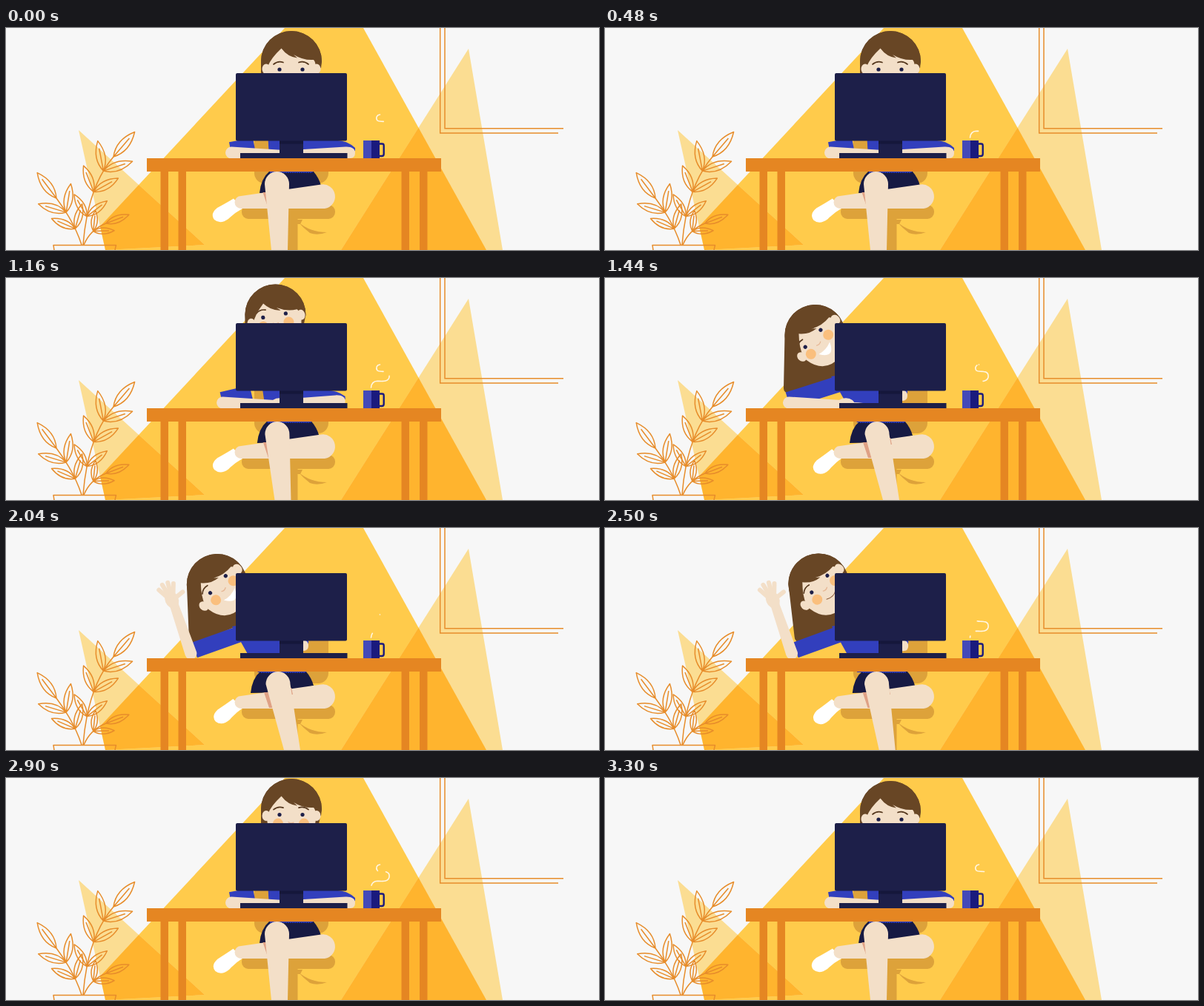
An HTML page for the animation above (3.32 s loop, 800 by 300 pixels).

```html
<!DOCTYPE html>
<html lang="en">
<head>
<meta charset="utf-8">
<title>Peeking from behind the monitor</title>
<style>
  html, body { margin: 0; width: 100%; height: 100%; overflow: hidden; background: #f7f7f7; }
  svg { display: block; width: 100%; height: 100%; }
  .skin { fill: #f3dfc8; }
  .hair { fill: #684625; }
  .blue { fill: #323fbd; }
  .navy { fill: #1d1f49; }
  .wood { fill: #e58622; }
  .chair { fill: #dda23a; }
  .pale { fill: #fbdd92; }
  .blush { fill: #fabf7d; }
  .line { fill: none; stroke: #e78d2b; stroke-width: 1.5; }
  #sleeve { fill: none; stroke: #323fbd; stroke-width: 22; }
  #hem { fill: none; stroke: #323fbd; stroke-width: 1.5; stroke-dasharray: 2 1; }
  #hand { stroke: #f3dfc8; stroke-width: 6; stroke-linecap: round; }
  #steam { fill: none; stroke: #fff6e4; stroke-width: 1.6; stroke-linecap: round; }
</style>
</head>
<body>
<svg viewBox="0 0 800 300" preserveAspectRatio="none">
  <defs>
    <path id="peak" d="M376 0H482L648 300H134L127 268Z"/>
    <path id="west" d="M98 138L268 293L134 300Z"/>
    <path id="east" d="M624 28L670 300H452Z"/>
    <clipPath id="inPeak"><use href="#peak"/></clipPath>
  </defs>
  <rect width="800" height="300" fill="#f7f7f7"/>
  <use href="#peak" fill="#ffcb4b"/>
  <g class="pale"><use href="#west"/><use href="#east"/></g>
  <g clip-path="url(#inPeak)" fill="#ffb42e"><use href="#west"/><use href="#east"/></g>
  <path class="line" d="M585.7 0V142H745M592 0V135.7H752"/>

  <g id="plant" class="line" stroke-linejoin="round">
    <path d="M65 300L64 293.5H148.5L147 300"/>
  </g>

  <g class="chair">
    <rect x="335" y="120" width="100" height="90" rx="14"/>
    <rect x="318" y="239" width="126" height="19" rx="9"/>
    <path d="M380 256H393.5V300H380ZM393 259H400L397 265H393Z"/>
    <path d="M394 262Q410 276 433 276Q420 281 410 277Q402 271 394 262Z"/>
  </g>

  <path id="shorts" fill="#171a43"/>
  <path id="foot" fill="#fff" d="M307 230.500L319 244Q308 250 300 258Q289 266 281 259Q275 251 285 243Q298 236 307 230.500Z"/>
  <path class="skin" d="M317 227L425 211.500A16.400 16.400 0 0 1 430 244H317A8.500 8.500 0 0 1 317 227Z"/>
  <path id="backHair" class="hair"/>
  <path id="torso" class="blue"/>
  <path id="hem"/>
  <path id="shade" fill="#dfa185"/>
  <path id="leg" class="skin"/>
  <path id="farSleeve" class="blue"/>
  <path id="farArm" class="skin"/>
  <path id="sleeve"/>

  <g id="head">
    <path class="skin" d="M-33 -5Q-26 -26 0 -26Q30 -26 33 -5V14Q30 45 0 45Q-30 45 -33 14Z"/>
    <g id="face">
      <circle class="blush" cx="-18" cy="12" r="7"/>
      <circle class="blush" cx="17" cy="12" r="7"/>
      <circle class="navy" cx="-16" r="2.600"/>
      <circle class="navy" cx="15" r="2.600"/>
      <path d="M-24 -7Q-18 -12 -11 -9.500M10 -9.500Q17 -12 23 -7" fill="none" stroke="#55371d" stroke-width="1.700" stroke-linecap="round"/>
      <path d="M-4 10Q-1 12.500 3 10.500" fill="none" stroke="#e6b795" stroke-width="1.300" stroke-linecap="round"/>
      <path id="mouth" stroke-linecap="round"/>
    </g>
    <path class="hair" d="M-41 0A41 41 0 0 1 41 0L40 9L32.500 8Q33 1 30 -2Q16 -1 3 -9L8 -4.500Q-5 -6 -13.500 -17.500Q-27 -5 -32 7L-39 9Z"/>
    <g id="ears" class="skin">
      <ellipse cx="-34" cy="10" rx="5.500" ry="7"/>
      <ellipse cx="34" cy="10" rx="5.500" ry="7"/>
    </g>
  </g>

  <g id="arm" class="skin">
    <path d="M0 -8L70 -6V6L0 8A8 8 0 0 1 0 -8Z"/>
    <g id="hand"><ellipse cx="77" rx="12" ry="9" stroke="none"/></g>
  </g>

  <g class="navy">
    <rect x="310" y="61" width="150" height="91.500" rx="2"/>
    <rect x="369" y="150" width="32" height="21"/>
    <rect x="316" y="169" width="144.500" height="8"/>
    <rect x="369" y="152.500" width="32" height="4" fill="#15173b"/>
  </g>

  <g class="wood">
    <rect x="190" y="176" width="397" height="18"/>
    <path d="M208.500 194H219V300H208.500ZM232.500 194H243V300H232.500ZM533.500 194H544V300H533.500ZM558 194H568.500V300H558Z"/>
  </g>

  <path d="M503 156.500H507.500Q509.700 156.500 509.700 159V170Q509.700 173 507.500 173H503" fill="none" stroke="#1a1a7d" stroke-width="2.400"/>
  <rect x="482" y="152" width="11.500" height="24" fill="#4349b8"/>
  <rect x="493" y="152" width="11" height="24" fill="#1a1a7d"/>
  <g id="steam"></g>
</svg>

<script>
const LOOP = 3320, TAU = 2 * Math.PI;
const mix = (a, b, k) => a + (b - a) * k;
const set = (id, name, value) => document.getElementById(id).setAttribute(name, value);

function add(parent, d = '') {
  const path = document.createElementNS('http://www.w3.org/2000/svg', 'path');
  path.setAttribute('d', d);
  document.getElementById(parent).append(path);
  return path;
}

// Eased 0 to 1 between two times.
function ramp(t, from, to) {
  const k = Math.min(Math.max((t - from) / (to - from), 0), 1);
  return k * k * (3 - 2 * k);
}
const span = (t, a, b, c, d) => ramp(t, a, b) - ramp(t, c, d);

function leaf(x, y, angle, size) {
  const at = (along, side) => {
    const c = Math.cos(angle) * size, s = Math.sin(angle) * size;
    return `${x + c * along - s * side} ${y + s * along + c * side}`;
  };
  add('plant', `M${x} ${y}Q${at(0.45, 0.29)} ${at(1, 0)}Q${at(0.45, -0.29)} ${x} ${y}L${at(0.75, 0)}`);
}

// A curved stem with pairs of leaves and one leaf at its tip.
function branch(x0, y0, cx, cy, x1, y1, pairs, size) {
  add('plant', `M${x0} ${y0}Q${cx} ${cy} ${x1} ${y1}`);
  const quad = (a, b, c, u) => mix(mix(a, b, u), mix(b, c, u), u);
  const heading = u => Math.atan2(mix(cy - y0, y1 - cy, u), mix(cx - x0, x1 - cx, u));
  for (let i = 1; i <= pairs; i++) {
    const u = 1.05 * i / (pairs + 1);
    for (const side of [-0.72, 0.72]) {
      leaf(quad(x0, cx, x1, u), quad(y0, cy, y1, u), heading(u) + side, size * mix(0.7, 1, u));
    }
  }
  leaf(x1, y1, heading(1), size);
}
branch(104, 293, 110, 215, 145, 174, 3, 44);
branch(102, 293, 92, 262, 68, 230, 2, 43);
branch(105, 293, 114, 272, 135, 264, 1, 33);

// Four fingers fanned out and a thumb.
const fingers = [-0.52, -0.17, 0.17, 0.5, 1.35].map(spread => ({
  spread, size: spread > 1 ? 18 : 24 - 8 * spread * spread, path: add('hand')
}));

const steam = { length: 63, puff: 38, speed: 0.0975, period: 1660 };
const puffs = [];
for (let k = -1; k < 2; k++) {
  for (const offset of [320, 822]) {
    const path = add('steam', 'M492.500 148C493 142 496 139.500 501 139.300C506 139.500 509 139.800 512 139C519 137 519 127 511 126.500C506 126 503 126.800 501 125C498.500 122 500 117.500 504.500 117');
    path.setAttribute('pathLength', steam.length);
    puffs.push({ start: offset + k * steam.period, path });
  }
}

function drawSteam(t) {
  for (const { start, path } of puffs) {
    const front = (t - start) * steam.speed, back = front - steam.puff;
    const a = Math.min(Math.max(back, 0), steam.length - 0.1);
    const b = Math.min(front, steam.length);
    path.style.display = front > 0 && back < steam.length + 20 ? '' : 'none';
    path.setAttribute('stroke-dasharray', `${Math.max(b - a, 0.05)} 999`);
    path.setAttribute('stroke-dashoffset', -a);
  }
}

function drawLegs(t) {
  const hips = span(t, 1050, 1380, 2360, 2740);
  const left = 342 - 12 * hips, right = 425 - 10 * hips;
  set('shorts', 'd', `M${left} 223Q${left + 2} 203 ${left + 14} 193H${right - 11}Q${right - 3} 202 ${right} 213L380 222Z`);
  set('hem', 'd', `M${left + 14} 195H${right - 12}`);

  const knee = 365.5 + 1.5 * hips, shin = 369 + 17 * hips;
  set('leg', 'd', `M${knee - 16.5} 211A16.500 17 0 0 1 ${knee + 16.5} 211L${shin + 11} 300H${shin - 11}Z`);
  set('shade', 'd', `M${knee - 19} 222H${knee}V243H${knee - 12}ZM${knee} 216H${knee + 13 + 5 * hips}L${knee + 15 + 5 * hips} 225H${knee}Z`);

  const swing = (1 - Math.cos(6 * TAU * t / LOOP)) / 2;
  set('foot', 'transform', `rotate(${-7.5 * swing} 312 238)`);
}

function drawBody(t, peek, drift) {
  const raise = span(t, 1620, 1880, 2520, 2740);
  set('torso', 'd', `M${352 - 47 * peek} ${120 + 13 * peek}L${418 - 43 * peek} 122L${414 - 9 * peek} 195H${356 - 16 * peek}Z`);

  const far = 471 - 63 * peek, lift = -10 * peek;
  set('farSleeve', 'd', `M385 152H${far - 31}Q${far - 13} 150 ${far} ${162 + lift}V${166 + lift}H385Z`);
  set('farArm', 'd', `M385 ${165 + lift}L${far - 13} ${160.5 + lift}Q${far} ${160 + lift} ${far} ${169 + lift}Q${far} ${176 + lift} ${far - 7} ${176 + lift}H385Z`);

  const elbow = 304 - 56 * peek + 3 * drift * peek;
  set('sleeve', 'd', `M${elbow - 1 + 6 * raise} 165L${335 - 19 * peek} ${159 - 16 * peek}`);

  const wave = Math.cos(TAU * (t - 2040) / 460);
  const angle = mix(2, -104 - 5 * wave, raise);
  set('arm', 'transform', `translate(${elbow} ${168.5 + raise}) rotate(${angle})`);
  set('hand', 'transform', `rotate(${-4 * wave * raise} 68 0)`);
  for (const { spread, size, path } of fingers) {
    const dx = Math.cos(spread * raise), dy = Math.sin(spread * raise);
    path.setAttribute('d', `M${77 + 4 * dx} ${7 * dy}L${77 + size * dx} ${size * dy}`);
  }
}

function drawHead(t, peek, drift) {
  const settle = ramp(t, 1640, 2000);
  const rise = span(t, 520, 780, 2950, 3270);
  const look = span(t, 520, 780, 2560, 3120);
  const smile = span(t, 1150, 1380, 2150, 2400);

  const x = mix(385, 283.5 + 3 * drift, peek);
  const y = mix(45 - 3 * rise, 77 - settle, peek);
  const faceY = 11 - 10 * look;
  const end = (10 * drift - 1.5) * peek;

  set('head', 'transform', `translate(${x} ${y}) rotate(${-48 * peek})`);
  set('face', 'transform', `translate(${(6 * settle - 5) * peek} ${faceY})`);
  set('ears', 'transform', `translate(0 ${0.4 * faceY - 4})`);
  set('backHair', 'transform', `translate(${x} ${y})`);
  set('backHair', 'd', `M-41 0A41 41 0 0 1 41 0L30 55L${end - 29} 79Q${end - 41} 80 ${end - 41} 72Z`);

  const open = smile > 0.15;
  set('mouth', 'd', open ? `M-11 20Q0 ${24 + 17 * smile} 11 20Q0 24 -11 20Z` : 'M-9 21Q0 27 9 21');
  set('mouth', 'fill', open ? '#fff' : 'none');
  set('mouth', 'stroke', open ? 'none' : '#8a5a3a');
}

function draw(t) {
  const peek = span(t, 1060, 1400, 2480, 2740);
  const drift = ramp(t, 1640, 2500);
  drawSteam(t);
  drawLegs(t);
  drawBody(t, peek, drift);
  drawHead(t, peek, drift);
}

const start = performance.now();
function tick() {
  draw((performance.now() - start) % LOOP);
  requestAnimationFrame(tick);
}
tick();
</script>
</body>
</html>
```
